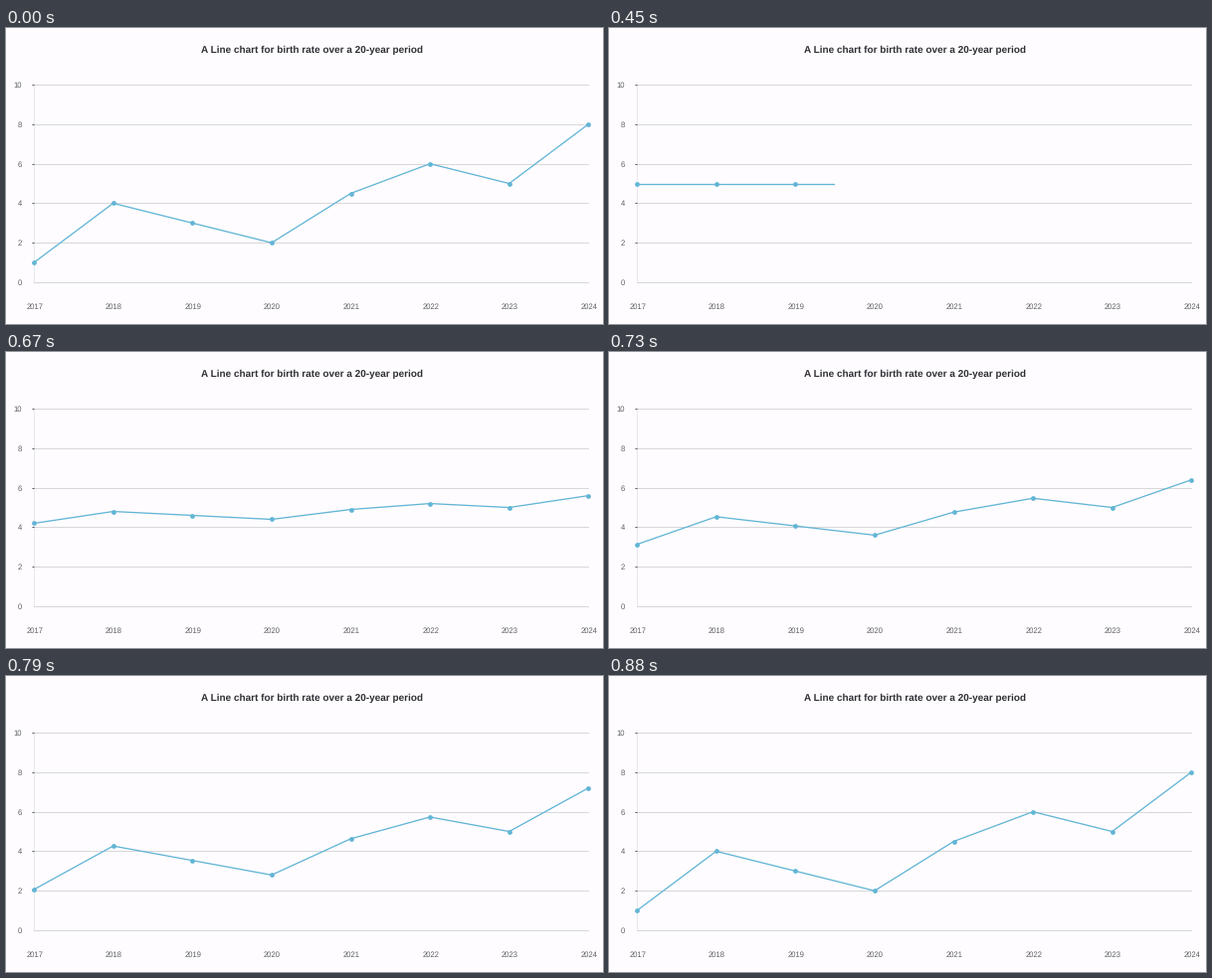
These frames come from a looping animation (600 by 298 pixels, 2120 ms). A matplotlib script:

```python
import matplotlib.pyplot as plt
import numpy as np
from matplotlib.animation import FuncAnimation
from matplotlib.transforms import Bbox

W, H, DPI = 600, 298, 100
LOOP, STEP = 2120, 10
BLUE, INK, GREY = "#62b5d5", "#2f2f35", "#5c5c62"
LEFT, RIGHT, TOP, BOTTOM = 28.1, 585.3, 57.05, 256.05
VALUES = np.array([1, 4, 3, 2, 4.5, 6, 5, 8])
MID = 5

# moments at which the picture is refreshed
TICKS = np.array([360, 390, 420, 450, 480, 510, 550, 580, 610,
                  640, 670, 700, 730, 760, 790, 850, 880])

plt.rcParams["font.family"] = "Liberation Sans"
plt.rcParams["text.hinting"] = "none"


def pt(px):
    return px * 72 / DPI


def y_of(v):
    return BOTTOM - (BOTTOM - TOP) * v / 10


def label(x, y, s, size, color, **kw):
    ax.text(x, y, s, fontsize=pt(size), color=color, va="baseline", **kw)


fig = plt.figure(figsize=(W / DPI, H / DPI), dpi=DPI, facecolor="#fefcff")
ax = fig.add_axes([0, 0, 1, 1])
ax.set(xlim=(0, W), ylim=(H, 0))
ax.axis("off")

label(307.2, 25, "A Line chart for birth rate over a 20-year period",
      10.05, INK, ha="center", weight="bold")

ax.plot([LEFT, LEFT], [TOP, BOTTOM], color="#e8e7eb", lw=pt(1), zorder=1)
for v in range(0, 11, 2):
    y = y_of(v)
    ax.plot([LEFT, RIGHT], [y, y], color="#d8d7da", lw=pt(1), zorder=1)
    if v:
        ax.plot([26.4, 28.2], [y, y], color="#55555a", lw=pt(1),
                solid_capstyle="butt", zorder=2)
    label(16.2, y + 2.9, str(v), 7.7, GREY, ha="right")

xs = np.linspace(LEFT, RIGHT, len(VALUES))
for i, x in enumerate(xs):
    label(x + 0.6, 283, str(2017 + i), 7.7, GREY, ha="center")

line, = ax.plot(xs, y_of(VALUES), color=BLUE, lw=pt(1.3), zorder=3)
dots, = ax.plot(xs, y_of(VALUES), "o", color=BLUE, ms=pt(4.8), mew=0, zorder=4)
dots.set_snap(False)


def progress(t):
    """Return (reveal, rise), both 0 to 1."""
    if t < TICKS[0] or t >= TICKS[-1]:
        return 1, 1
    t = TICKS[TICKS <= t][-1]
    reveal = 0.0503 + (t - 360) * 0.8507 / 250
    rise = np.clip((t - 625) / 225, 0, 0.93)
    return min(reveal, 1), rise


def draw(n):
    reveal, rise = progress(n * STEP)
    ys = y_of(MID + (VALUES - MID) * rise)
    edge = W if reveal >= 1 else LEFT + (RIGHT - LEFT) * reveal
    for part in (line, dots):
        part.set_ydata(ys)
        part.set_clip_box(Bbox.from_bounds(0, 0, edge, H))
    return line, dots


anim = FuncAnimation(fig, draw, frames=LOOP // STEP, interval=STEP,
                     repeat=True, repeat_delay=0, blit=False)
plt.show()
```
